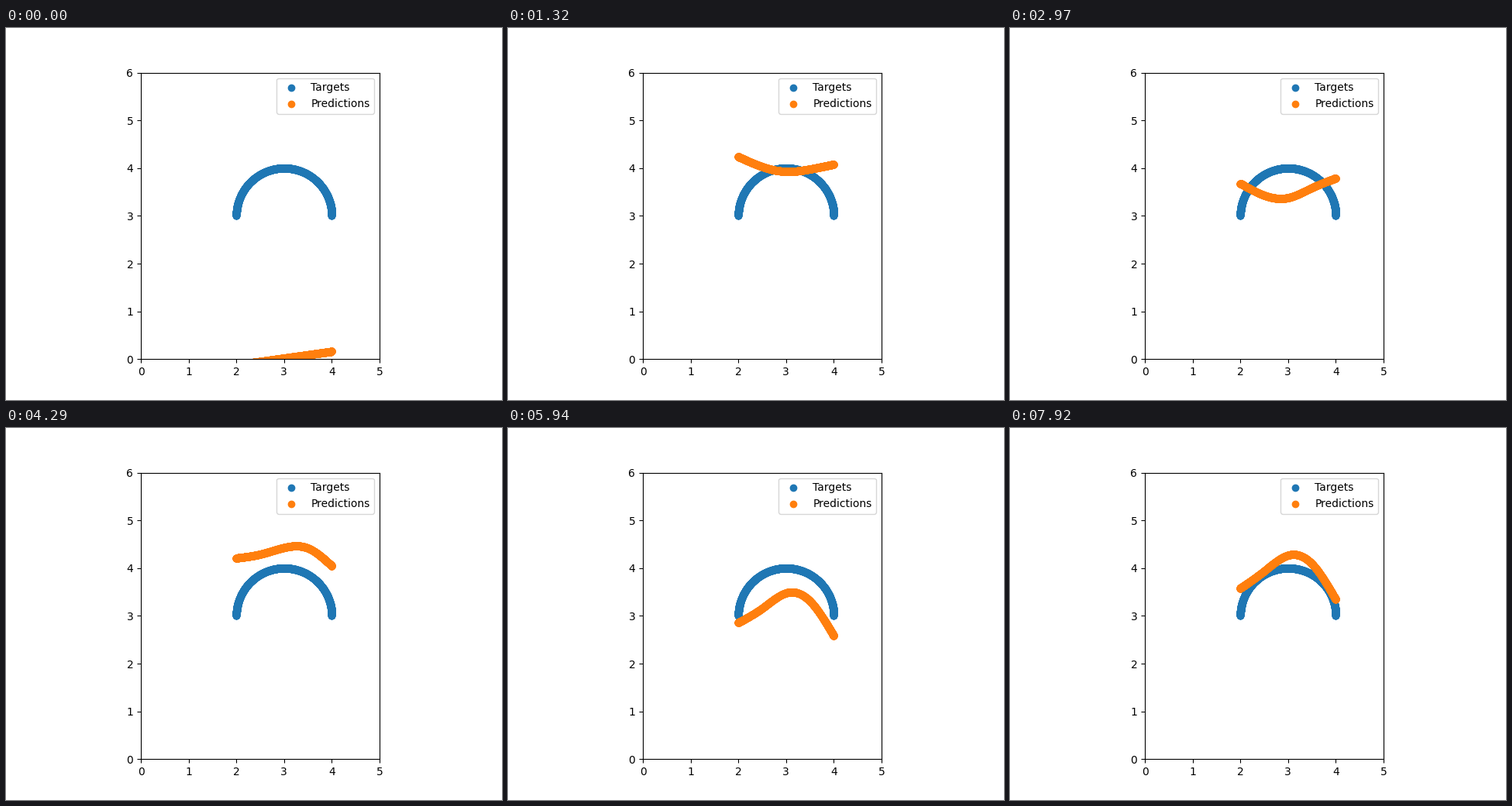
Animation, 640 px wide and 480 px high, one loop 8000 ms. Source, as a matplotlib script:

```python
import numpy as np
import matplotlib.pyplot as plt
from matplotlib.animation import FuncAnimation

LOOP_MS = 8000
TICK_MS = 40     # timer interval
STEP_MS = 330    # time between two training snapshots

# Key poses: training step -> height of the curve at x = 2, 2.5, 3, 3.5, 4
KNOTS = np.linspace(2, 4, 5)
POSES = {
    0: (-0.12, -0.05, 0.02, 0.09, 0.16),
    2: (4.27, 4.40, 4.53, 4.66, 4.76),
    4: (4.24, 4.03, 3.93, 3.98, 4.08),
    6: (2.87, 2.37, 2.12, 2.40, 2.77),
    9: (3.68, 3.43, 3.38, 3.59, 3.79),
    12: (4.35, 4.38, 4.49, 4.52, 4.26),
    15: (3.61, 3.77, 3.97, 3.89, 3.35),
    18: (2.86, 3.16, 3.48, 3.31, 2.58),
    21: (3.06, 3.40, 3.74, 3.54, 2.75),
    24: (3.58, 3.94, 4.27, 4.09, 3.34),
}


def spline(knots, values, at):
    """Natural cubic spline: cubic radial terms plus a straight line."""
    knots, values, at = (np.asarray(a, float) for a in (knots, values, at))
    line = np.column_stack([np.ones_like(knots), knots])
    radial = np.abs(knots[:, None] - knots) ** 3
    system = np.block([[radial, line], [line.T, np.zeros((2, 2))]])
    weights = np.linalg.solve(system, np.vstack([values, np.zeros((2, values.shape[1]))]))
    basis = np.column_stack([np.abs(at[:, None] - knots) ** 3, np.ones_like(at), at])
    return basis @ weights


angles = np.linspace(np.pi, 0, 1000)
xs = 3 + np.cos(angles)

# Ease between the poses in time, then draw a smooth curve through the knots
steps = np.arange(LOOP_MS // STEP_MS + 1)
heights = spline(list(POSES), list(POSES.values()), steps)
curves = spline(KNOTS, heights.T, xs).T

fig, ax = plt.subplots(figsize=(6.4, 4.8), dpi=100)
ax.scatter(xs, 3 + np.sin(angles), color="tab:blue", label="Targets")
predictions = ax.scatter(xs, curves[0], color="tab:orange", label="Predictions")
ax.set_aspect("equal")
ax.set_xlim(0, 5)
ax.set_ylim(0, 6)
ax.legend(loc="upper right")


def update(tick):
    step = (tick * TICK_MS + TICK_MS - 1) // STEP_MS
    predictions.set_offsets(np.column_stack([xs, curves[step]]))
    return (predictions,)


anim = FuncAnimation(fig, update, frames=LOOP_MS // TICK_MS, interval=TICK_MS,
                     init_func=lambda: update(0), repeat=True, repeat_delay=0)

plt.show()
```
